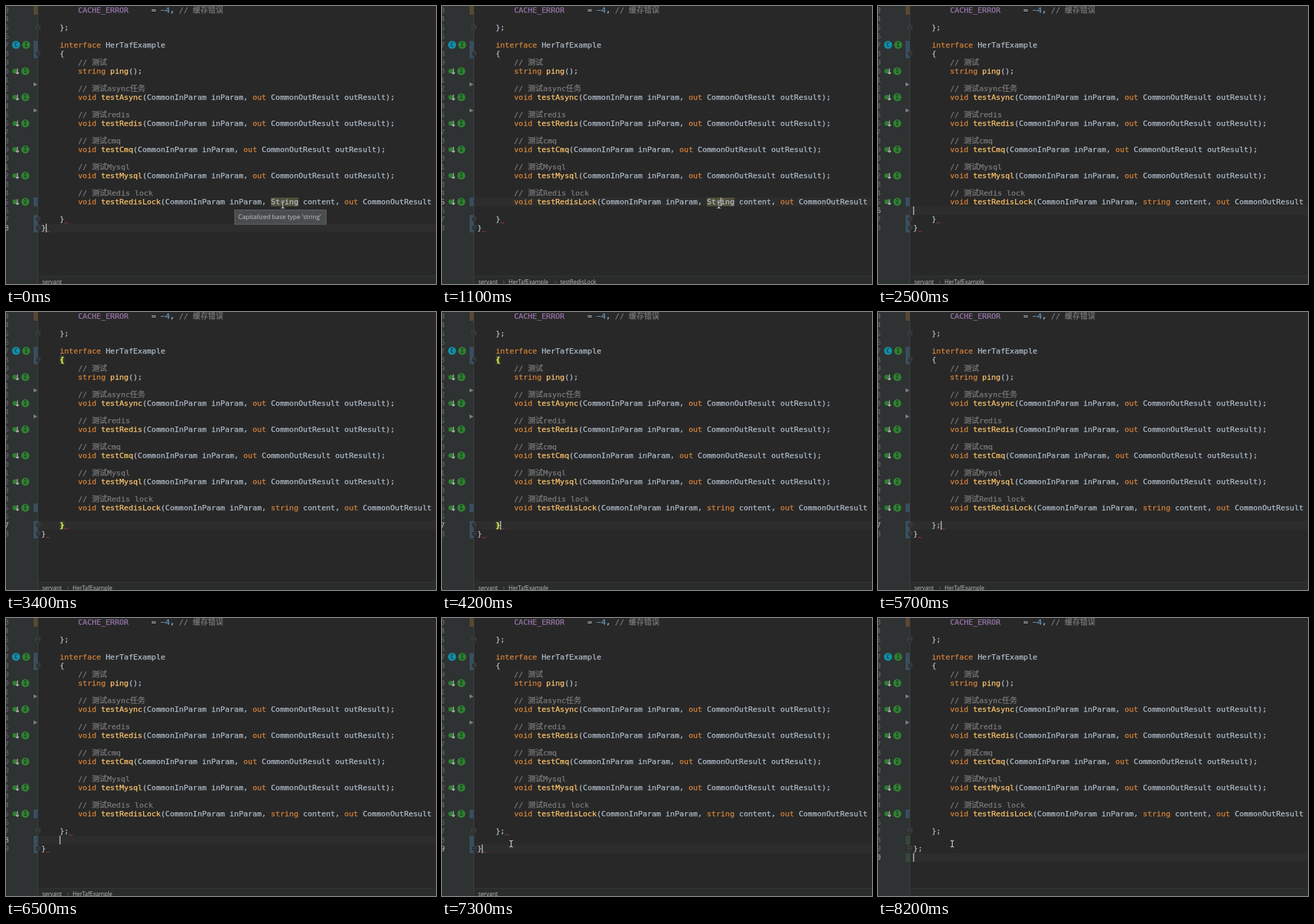
Animation, 640 px wide and 415 px high, one loop 8.3 s. Source, as an HTML page with a canvas:

```html
<!DOCTYPE html>
<html lang="zh-CN">
<head>
<meta charset="utf-8">
<title>Editor session</title>
<style>
  html, body { margin: 0; width: 100%; height: 100%; overflow: hidden; background: #282828; }
  canvas { display: block; width: 640px; height: 415px; }
</style>
</head>
<body>
<canvas id="stage"></canvas>
<script>
const W = 640, H = 415, LOOP = 8300;
const LEFT = 52.6, CHAR = 6.833, TOP = 6.5, LINE = 13, GUTTER = 48, BASELINE = 3.5;
const CODE_FONT = '11.35px "DejaVu Sans Mono", "Noto Sans CJK SC", "Noto Sans CJK", monospace';
const uiFont = size => `${size}px "Open Sans", sans-serif`;

const canvas = document.getElementById('stage');
const ctx = canvas.getContext('2d');
const ratio = window.devicePixelRatio || 1;
canvas.width = W * ratio;
canvas.height = H * ratio;
ctx.scale(ratio, ratio);
ctx.textBaseline = 'alphabetic';
ctx.lineJoin = 'round';

const COLOR = {
  text: '#b0bdcb', keyword: '#d68239', method: '#ffc66d', comment: '#7b7b7b',
  constant: '#9876aa', number: '#6897bb', brace: '#ffef28', bg: '#282828',
  gutter: '#2e3232', active: '#2d2d2d', changed: '#374f60', added: '#34493a', icon: '#2f7f31'
};

const method = name => `        void ${name}(CommonInParam inParam, out CommonOutResult outResult);`;
const HEAD = [
  '        CACHE_ERROR     = −4, // 缓存错误', '', '    };', '',
  '    interface HerTafExample', '    {',
  '        // 测试', '        string ping();', '',
  '        // 测试async任务', method('testAsync'), '',
  '        // 测试redis', method('testRedis'), '',
  '        // 测试cmq', method('testCmq'), '',
  '        // 测试Mysql', method('testMysql'), '',
  '        // 测试Redis lock'
];
const METHOD_LINES = [7, 10, 13, 16, 19, 22];
const CRUMBS = [['servant', 54], ['HerTafExample', 99], ['testRedisLock', 176]];

// Each step keeps the values of the one before unless it overrides them.
const STEPS = [
  { at: 0, line: 25, col: 1, word: 'String', tail: ['    }', '}'], crumbs: 1, pointer: true, errors: [[24, 5], [25, 1]] },
  { at: 700, line: 22, col: 53, crumbs: 3 },
  { at: 1300, col: 51, pointer: false },
  { at: 1500, col: 50, word: 'tring' },
  { at: 1700, col: 51, word: 'string' },
  { at: 2100, line: 23, col: 0, crumbs: 2 },
  { at: 2800, line: 24, col: 5, match: true },
  { at: 5500, col: 6, match: false, tail: ['    };', '}'], errors: [[24, 6], [25, 1]] },
  { at: 6100, line: 25, col: 4, tail: ['    };', '', '}'], errors: [[24, 6], [26, 1]] },
  { at: 7000, line: 26, col: 1, crumbs: 1 },
  { at: 7500, col: 2, tail: ['    };', '', '};'], errors: [] },
  { at: 7900, line: 27, col: 0, tail: ['    };', '', '};', ''], crumbs: 0 }
];

const colX = col => LEFT + col * CHAR;
const midY = line => TOP + line * LINE;

function rect(x, y, w, h, color) {
  ctx.fillStyle = color;
  ctx.fillRect(x, y, w, h);
}

function label(str, x, y, color, font) {
  ctx.font = font;
  ctx.fillStyle = color;
  ctx.fillText(str, x, y);
}

// Code is drawn slightly heavier, like smoothed desktop text.
function codeLabel(str, x, line, color, font = CODE_FONT) {
  const y = midY(line) + BASELINE;
  label(str, x, y, color, font);
  ctx.strokeStyle = color;
  ctx.lineWidth = .25;
  ctx.strokeText(str, x, y);
}

function path(points, color, { fill = false, width = 1, close = false } = {}) {
  ctx.beginPath();
  points.forEach(([x, y]) => ctx.lineTo(x, y));
  if (close) ctx.closePath();
  if (fill) {
    ctx.fillStyle = color;
    ctx.fill();
  } else {
    ctx.strokeStyle = color;
    ctx.lineWidth = width;
    ctx.stroke();
  }
}

function disc(x, y, r, color) {
  ctx.fillStyle = color;
  ctx.beginPath();
  ctx.arc(x, y, r, 0, Math.PI * 2);
  ctx.fill();
}

function tokenColor(token, rest) {
  if (token.startsWith('//')) return COLOR.comment;
  if (/^(interface|void|string|out)$/.test(token)) return COLOR.keyword;
  if (token === 'CACHE_ERROR') return COLOR.constant;
  if (/\d$/.test(token)) return COLOR.number;
  if (/^\w/.test(token) && rest.startsWith('(')) return COLOR.method;
  return COLOR.text;
}

function drawCode(code, line) {
  for (const m of code.matchAll(/\/\/.*|−?\w+|[^\s\w]/g)) {
    const rest = code.slice(m.index + m[0].length);
    codeLabel(m[0], colX(m.index), line, tokenColor(m[0], rest));
  }
}

function drawMatch(char, line) {
  rect(colX(4), midY(line) - 6.5, CHAR, LINE, '#354540');
  codeLabel(char, colX(4), line, COLOR.brace, 'bold ' + CODE_FONT);
}

function drawFold(line) {
  const y = midY(line);
  const shape = [[44.5, y - 3.5], [50.5, y - 3.5], [50.5, y + 1], [47.5, y + 4], [44.5, y + 1]];
  path(shape, COLOR.bg, { fill: true });
  path(shape, '#484b4c', { close: true });
  path([[46, y - .5], [49, y - .5]], '#585b5d');
}

function drawRoundIcon(x, y, color, letter) {
  disc(x, y, 6, color);
  ctx.textAlign = 'center';
  label(letter, x, y + 3, '#1b3a26', 'bold 8px "DejaVu Sans Mono", monospace');
  ctx.textAlign = 'left';
}

function drawGutter(s, count) {
  rect(0, 0, GUTTER, H, COLOR.gutter);
  const strip = (line, rows, color) => rect(41, midY(line) - 6.5, 6.5, rows * LINE, color);
  strip(0, 1, '#594832');
  strip(4, 2, COLOR.changed);
  strip(22, 1, COLOR.changed);
  if (s.tail.length < 4) {
    strip(22 + s.tail.length, 2, COLOR.changed);
  } else {
    strip(25, 1, COLOR.added);
    strip(27, 1, COLOR.added);
  }
  path([[47.5, 0], [47.5, H]], '#3c3f40');

  for (let i = 0; i < count; i++) {
    codeLabel((3 + i) % 10, -2.4, i, i === s.line ? '#a4a3a3' : '#606366');
  }
  drawRoundIcon(15, 58, '#128fac', 'C');
  drawRoundIcon(30, 58, COLOR.icon, 'I');
  for (const line of METHOD_LINES) {
    const y = midY(line) - .25;
    disc(13, y, 3.5, COLOR.icon);
    path([[17, y - 4], [17, y + 4]], '#c0c5c3', { width: 1.2 });
    path([[14.8, y + 1.8], [17, y + 4], [19.2, y + 1.8]], '#c0c5c3', { width: 1.2 });
    drawRoundIcon(28.7, y, COLOR.icon, 'I');
  }
  for (const y of [117, 156]) {
    path([[41, y - 3], [47, y], [41, y + 3]], '#7c7f80', { fill: true });
  }
  const lastBrace = s.tail.length === 2 ? 25 : 26;
  [2, 5, 24, lastBrace].forEach(drawFold);
}

function drawErrors(errors) {
  for (const [line, col] of errors) {
    const x = colX(col), y = midY(line) + 5.5;
    path([0, 1, 2, 3].map(k => [x + k * 2, y + (k % 2 ? -1 : .5)]), '#a9443f', { width: .9 });
  }
}

function drawPointer(x, y) {
  const shape = (color, width) => {
    path([[x, y - 4], [x, y + 4]], color, { width });
    path([[x - 2.5, y - 5], [x, y - 4], [x + 2.5, y - 5]], color, { width });
    path([[x - 2.5, y + 5], [x, y + 4], [x + 2.5, y + 5]], color, { width });
  };
  shape('#222', 2.6);
  shape('#e6e6e6', 1.1);
}

function drawTip() {
  rect(340, 304, 137, 22.5, '#606365');
  rect(341, 305, 135, 20.5, '#4a4d4e');
  label("Capitalized base type 'string'", 345.5, 318, '#c3c5c6', uiFont(9.4));
}

function drawCrumbs(count) {
  rect(GUTTER, 403, W - GUTTER, H - 403, '#2a2c2c');
  rect(0, 403, W, 1, '#323535');
  CRUMBS.slice(0, count).forEach(([name, x], i) => {
    label(name, x, 415, '#bcbebf', uiFont(8.4));
    if (i) path([[x - 8, 410], [x - 6, 412], [x - 8, 414]], '#646768', { width: .8 });
  });
}

function pointerAt(t, s) {
  if (s.pointer) return [412, 297];
  if (t >= 4300 && t < 5500) return [91.5, 322.5];
  if (t >= 7000) {
    const k = Math.max(0, Math.min(1, (t - 7000) / 400));
    return [62 + 48.5 * k * k * (3 - 2 * k), 337];
  }
  return null;
}

function stateAt(t) {
  return Object.assign({}, ...STEPS.filter(step => step.at <= t));
}

function render(t) {
  const s = stateAt(t);
  const lines = [
    ...HEAD,
    `        void testRedisLock(CommonInParam inParam, ${s.word} content, out CommonOutResult`,
    '', ...s.tail
  ];
  rect(0, 0, W, H, COLOR.bg);
  rect(GUTTER, midY(s.line) - 6.5, W - GUTTER, LINE, COLOR.active);
  drawGutter(s, lines.length);
  if (s.word === 'String') rect(colX(50), midY(22) - 6.5, 6 * CHAR, LINE, '#52503a');
  lines.forEach(drawCode);
  if (s.match) {
    drawMatch('{', 5);
    drawMatch('}', 24);
  }
  drawErrors(s.errors);
  if ((t - s.at) % 1000 < 500) rect(colX(s.col) - .2, midY(s.line) - 6.5, 1.3, LINE, '#c8c8c8');
  if (t < 600) drawTip();
  drawCrumbs(s.crumbs);
  const pointer = pointerAt(t, s);
  if (pointer) drawPointer(...pointer);
}

const start = performance.now();
function tick() {
  const t = (performance.now() - start) % LOOP;
  render(Math.floor(t / 100) * 100);
  requestAnimationFrame(tick);
}
tick();
</script>
</body>
</html>
```
